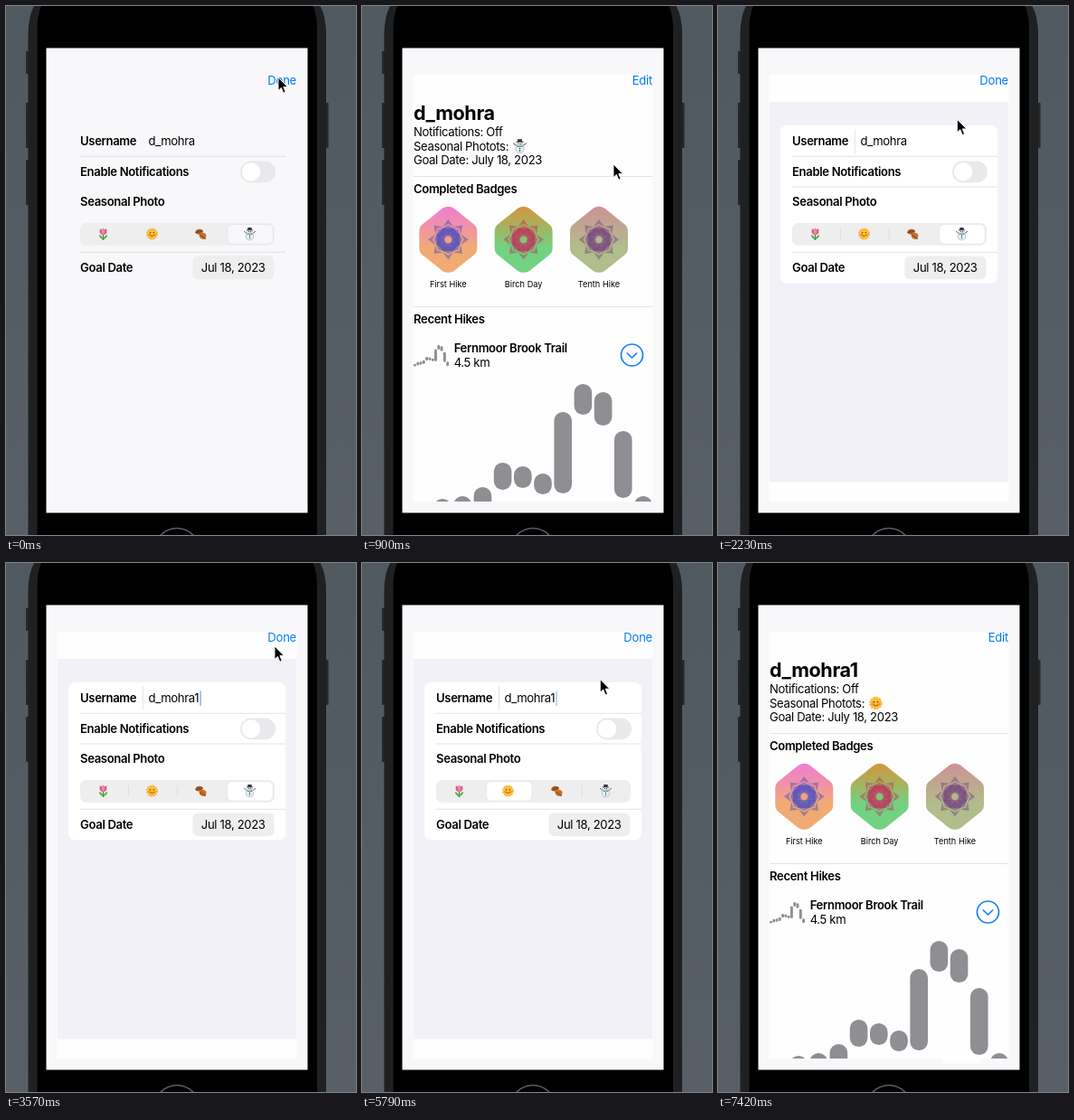
Animation of 387 by 585 pixels, one loop 7.71 s. Source, as an HTML page:

```html
<!DOCTYPE html>
<html lang="en">
<head>
<meta charset="utf-8">
<title>Profile editor</title>
<style>
  html, body { margin: 0; width: 100%; height: 100%; overflow: hidden; background: #555d65; }
  svg { display: block; width: 100vw; height: 100vh; }
  text { font: 400 13.1px Inter, "Noto Sans", sans-serif; letter-spacing: -.35px; fill: #000; white-space: pre; }
  .semi { font-weight: 600; }
  .title { font-size: 21.6px; font-weight: 700; letter-spacing: -.4px; }
  .small { font-size: 9.2px; letter-spacing: 0; text-anchor: middle; }
  .link { fill: #007aff; text-anchor: end; letter-spacing: -.25px; }
  .rule { stroke: #dcdce0; stroke-width: .8; fill: none; }
  .flat .plate { visibility: hidden; }
</style>
</head>
<body>
<svg viewBox="0 0 387 585">
  <defs>
    <linearGradient id="wall" x1="0" y1="0" x2="0" y2="1">
      <stop offset="0" stop-color="#515960"/><stop offset="1" stop-color="#585f67"/>
    </linearGradient>
    <clipPath id="page"><rect x="57" y="76" width="264" height="472"/></clipPath>

    <g id="tulip">
      <path d="M0 7V0" stroke="#3f8f3c" stroke-width="1.3"/>
      <path d="M0 6.5Q-5 4-4.5 1-1 2 0 6.5 1 2 4.5 1 5 4 0 6.5Z" fill="#5aa84a"/>
      <path d="M-3.5-6L-1.6-4.5 0-6.6 1.6-4.5 3.5-6Q5.500 1 0 1T-3.5-6Z" fill="#e05a86"/>
      <path d="M0-6.6Q3.400-2.500 0 .8-3.400-2.500 0-6.6Z" fill="#f08aa6"/>
    </g>
    <g id="sun">
      <circle r="5.8" fill="none" stroke="#f5a623" stroke-width="1.2" stroke-dasharray="2 1"/>
      <circle r="5.5" fill="#fcbf35"/>
      <circle cx="-1.9" cy="-1.2" r=".8" fill="#7a4a12"/><circle cx="1.9" cy="-1.2" r=".8" fill="#7a4a12"/>
      <path d="M-2.5 1.3Q0 4 2.5 1.3" fill="none" stroke="#a8501c"/>
      <circle cx="-3.5" cy="1" r="1.1" fill="#f58f3a"/><circle cx="3.5" cy="1" r="1.1" fill="#f58f3a"/>
    </g>
    <g id="leaf">
      <path d="M-6.5-1.5C-5-6 0-6 2.5-3.5 2 0-3 2.5-6.5-1.5Z" fill="#a85a22"/>
      <path d="M-2 1C0-3 4.500-2 6 1.5 6 4 5 5.500 4 6 0 6-2 4-2 1Z" fill="#c4702a"/>
      <path d="M-5.5-1.7L2-3.3M-1 1.5L5.5 5.5" stroke="#70391a" stroke-width=".8"/>
    </g>
    <g id="snow">
      <path d="M-3.500-.5L-6.500-3M3.500-.5L6.500-3" stroke="#6b5a4c" stroke-width=".9"/>
      <circle cy="2.700" r="4.1" fill="#e8f0f4" stroke="#93a8b4" stroke-width=".6"/>
      <circle cy="-2.200" r="2.9" fill="#f1f6f8" stroke="#93a8b4" stroke-width=".6"/>
      <path d="M-2.2-7H2.2V-4.600H3.600V-3.700H-3.600V-4.600H-2.200Z" fill="#34383d"/>
      <path d="M-2.8.2H2.8" stroke="#4f9aa8" stroke-width="1.3"/>
      <circle cx="-1" cy="-2.500" r=".5"/><circle cx="1" cy="-2.500" r=".5"/>
      <circle cy="2.300" r=".6"/><circle cy="4.500" r=".6"/>
      <path d="M0-2L1.700-1.400 0-1Z" fill="#ee8130"/>
    </g>
  </defs>

  <!-- phone -->
  <rect width="387" height="585" fill="url(#wall)"/>
  <path d="M23.5 50V75M23.5 107V157M23.5 170V220M355 107V157" stroke="#25272a" stroke-width="3"/>
  <path d="M31 0Q24.500 12 24.500 32V585H354V32Q354 12 347.500 0Z" fill="#1f2022"/>
  <path d="M39 0Q34.500 10 34.500 26V585H344V26Q344 10 339.500 0Z"/>
  <circle cx="189" cy="602.500" r="25" fill="none" stroke="#5c5c5e" stroke-width="1.5"/>
  <rect x="44.500" y="46.500" width="289" height="514" fill="#f8f8fb"/>
  <rect id="sheet" x="56.500" y="76" width="265" height="472.500" fill="#fefefe"/>
  <rect id="patch" x="248" y="548" width="42" height="5.500" fill="#fefefe"/>

  <!-- editor -->
  <g id="form">
    <g class="plate">
      <rect x="57" y="106" width="264" height="420.500" fill="#f2f1f7"/>
      <rect x="69" y="132" width="240" height="174.500" rx="7.500" fill="#fff"/>
      <path class="rule" d="M82 200H309M151.300 136V163"/>
    </g>
    <path class="rule" d="M82 166.300H309M82 272.300H309"/>
    <text class="semi" x="82" y="154.300">Username</text>
    <text id="field" x="157.500" y="154.300"></text>
    <rect id="caret" y="141.500" width="1.600" height="16.500" fill="#2f7be8"/>
    <text class="semi" x="82" y="188">Enable Notifications</text>
    <rect x="259" y="171.500" width="39" height="23.800" rx="11.900" fill="#e9e9eb"/>
    <circle cx="271" cy="183.400" r="10.700" fill="#fff" stroke="#dedee1" stroke-width=".6"/>
    <text class="semi" x="82" y="221">Seasonal Photo</text>
    <rect x="82" y="240" width="215" height="24.700" rx="6.500" fill="#eeeeef"/>
    <g class="plate">
      <path id="splitA" class="rule" d="M135.500 246V259M189.300 246V259"/>
      <path id="splitB" class="rule" d="M243.300 246V259"/>
    </g>
    <rect id="pill" y="241.500" width="50.500" height="21.700" rx="5.500" fill="#fff" stroke="#dfdfe2" stroke-width=".6"/>
    <use href="#tulip" x="107.500" y="252"/><use href="#sun" x="161.500" y="252"/>
    <use href="#leaf" x="215.500" y="252"/><use href="#snow" x="269.500" y="252"/>
    <text class="semi" x="82" y="294">Goal Date</text>
    <rect x="206.500" y="276.500" width="90" height="25.700" rx="6" fill="#eeeeef"/>
    <text x="215.800" y="294">Jul 18, 2023</text>
  </g>

  <!-- summary -->
  <g id="profile" clip-path="url(#page)">
    <text id="name" class="title" x="57" y="126"></text>
    <text x="57" y="143.700">Notifications: Off</text>
    <text x="57" y="159.500">Seasonal Photots:</text>
    <use id="season" transform="translate(174.500 155) scale(1.120)"/>
    <text x="57" y="175.200">Goal Date: July 18, 2023</text>
    <path class="rule" d="M57 188.500H321M57 332.500H321"/>
    <text class="semi" x="57" y="207">Completed Badges</text>
    <g id="badges"></g>
    <text class="semi" x="57" y="351">Recent Hikes</text>
    <g id="mini" fill="#8e8e93"></g>
    <text class="semi" x="101.700" y="383">Fernmoor Brook Trail</text>
    <text x="101.700" y="398.700">4.5 km</text>
    <g fill="none" stroke="#1580f8" stroke-width="1.700" stroke-linecap="round" stroke-linejoin="round">
      <circle cx="298.500" cy="386" r="12"/><path d="M293.300 384L298.500 389 303.700 384"/>
    </g>
    <g id="chart" fill="#8e8e93"></g>
  </g>

  <text id="edit" class="link" x="321" y="87">Edit</text>
  <text id="done" class="link" x="321" y="87">Done</text>
  <path id="cursor" d="M0 0V14.500L3.400 11.400 5.800 17.200 8.200 16.200 5.800 10.600H10.400Z" stroke="#fff" stroke-width=".9"/>
</svg>

<script>
const LOOP = 7710;
const STEP = 148.2; // the picture refreshes in steps of this length
const USER = 'd_mohra';

const el = id => document.getElementById(id);
const clamp = v => Math.max(0, Math.min(1, v));
const mix = (a, b, u) => a + (b - a) * u;
const ease = (t, start, span) => {
  const u = clamp((t - start) / span);
  return u * u * (3 - 2 * u);
};
const svgEl = (parent, tag, attrs) => {
  const node = document.createElementNS('http://www.w3.org/2000/svg', tag);
  for (const key in attrs) node.setAttribute(key, attrs[key]);
  return parent.appendChild(node);
};

// Badges: a rounded hexagon and eight overlapping mountain symbols
const HEX = 'M6.4-34.6Q0-38.5-6.4-34.6L-28.8-16.6Q-32-14-32-8.9V8.9Q-32 14-28.8 16.6' +
  'L-6.4 34.6Q0 38.5 6.4 34.6L28.8 16.6Q32 14 32 8.9V-8.9Q32-14 28.8-16.6Z';
const PEAK = 'M0-22.3L-6.1-14 0-17.4 6.1-14ZM0-15.7L-6.1-12.4-12.7-3.7H12.7L6.1-12.4Z';

function badge(index, label, top, bottom, ink) {
  const x = 95.3 + index * 83.35;
  const id = 'hue' + index;
  const box = el('badges');
  const hue = svgEl(box, 'linearGradient', { id, x1: 0, y1: 0, x2: 0, y2: .62 });
  svgEl(hue, 'stop', { offset: 0, 'stop-color': top });
  svgEl(hue, 'stop', { offset: 1, 'stop-color': bottom });
  const g = svgEl(box, 'g', { transform: `translate(${x} 258.3)` });
  svgEl(g, 'path', { d: HEX, fill: `url(#${id})` });
  for (let i = 0; i < 8; i++)
    svgEl(g, 'path', { d: PEAK, fill: ink, opacity: .5, transform: `rotate(${i * 45})` });
  svgEl(box, 'text', { class: 'small', x, y: 311.3 }).textContent = label;
}
badge(0, 'First Hike', '#ef7bd6', '#f0ab74', '#4f4fbf');
badge(1, 'Birch Day', '#d6943e', '#72d281', '#bd355f');
badge(2, 'Tenth Hike', '#cd9296', '#b1bd8b', '#77477f');

// Elevation ranges: top and bottom of each capsule
const HILLS = [[558, 575], [545, 570], [542, 565], [532, 560], [505, 535], [509, 533],
  [517, 540], [449, 539], [418, 452], [427, 464], [470, 544], [542, 575]];
function bars(id, y0, scale) {
  const width = 19.6 * scale;
  HILLS.forEach(([top, bottom], i) => svgEl(el(id), 'rect', {
    x: 57 + i * 22.2 * scale, y: y0 + (top - 418) * scale,
    width, height: Math.max(width, (bottom - top) * scale), rx: width / 2
  }));
}
bars('chart', 418, 1);
bars('mini', 375, .148);

// Pointer moves: start, duration, destination
const MOVES = [[270, 230, 278, 175], [900, 520, 292.5, 82], [1780, 740, 249, 149],
  [3200, 340, 297, 92], [4150, 750, 169.5, 253], [5500, 430, 300, 80],
  [6080, 140, 278.5, 130], [6250, 400, 279, 196], [6750, 650, 240, 600]];
const pointer = t => MOVES.reduce(([x, y], [start, span, toX, toY]) => {
  const u = ease(t, start, span);
  return [mix(x, toX, u), mix(y, toY, u)];
}, [301, 79]);

// 1 while the editor is shown, 0 while the summary is
const editing = (t, span, lead = 0) =>
  1 - ease(t + lead, 190, span) + ease(t + lead, 1780, span) - ease(t + lead, 6087, span);

const fade = (id, value) => { el(id).style.opacity = value; };
const show = (id, on) => { el(id).style.visibility = on ? 'visible' : 'hidden'; };

function draw(now) {
  const t = Math.floor(now % LOOP / STEP) * STEP;
  const typed = t > 2900;
  const picked = t > 5100;
  const form = editing(t, 380);
  const button = editing(t, 170, 50);
  const blink = Math.min(1, 1.1 + Math.cos((t - 2820) / 1130 * 2 * Math.PI));

  el('cursor').setAttribute('transform', `translate(${pointer(t)})`);
  fade('form', form);
  fade('profile', 1 - form);
  fade('done', button);
  fade('edit', clamp(1 - 5 * button));
  el('form').classList.toggle('flat', t < 1700);
  show('sheet', t > 200);
  show('patch', t > 7100);

  el('name').textContent = el('field').textContent = USER + (typed ? '1' : '');
  el('caret').setAttribute('x', typed ? 214.3 : 209.5);
  fade('caret', t < 2800 ? 0 : blink);

  el('pill').setAttribute('x', mix(244.7, 137.5, ease(t, 5000, 350)));
  el('pill').setAttribute('fill', t < 200 ? '#f8f8fb' : '#fff');
  el('season').setAttribute('href', picked ? '#sun' : '#snow');
  fade('splitA', picked ? 0 : 1);
  fade('splitB', picked ? 1 : 0);
}

const begin = performance.now();
function tick() {
  draw(performance.now() - begin);
  requestAnimationFrame(tick);
}
tick();
</script>
</body>
</html>
```
